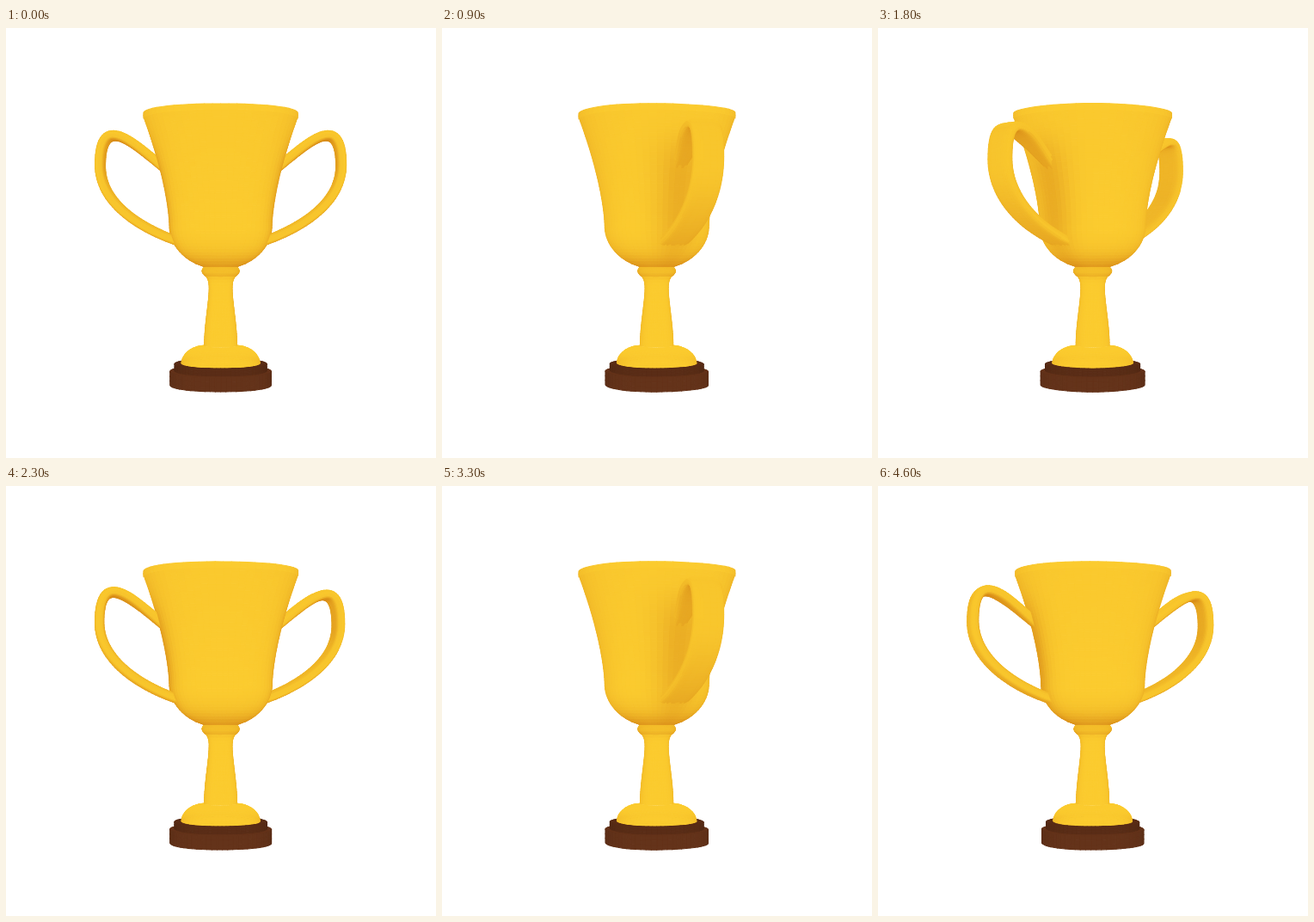
An HTML page with a canvas that plays this animation: 500x500 px, repeating every 4.7 s.

```html
<!DOCTYPE html>
<html lang="en">
<head>
<meta charset="utf-8">
<title>Rotating trophy</title>
<style>
html, body { margin: 0; height: 100%; overflow: hidden; background: #fff; }
canvas { display: block; width: 500px; height: 500px; }
</style>
</head>
<body>
<canvas id="stage" width="500" height="500"></canvas>
<script>
const ctx = document.getElementById('stage').getContext('2d');
const CAMERA = 1200, CX = 249.6, CY = 250;
const STEP_MS = 100, STEPS = 47, TURN = Math.PI / 24;
const GOLD = { dark: [216, 140, 25], light: [251, 203, 47] };
const BROWN = { dark: [66, 32, 15], light: [100, 51, 26] };

const faces = [];
const ease = t => t * t * (3 - 2 * t);
const bump = (x, width) => Math.exp(-((x / width) ** 2));
const range = (n, fn) => Array.from({ length: n + 1 }, (_, i) => fn(i / n));

// Joins a grid of points into faces; shade(i, j) gives the local darkening.
function addGrid(grid, tint, shade) {
  for (let i = 0; i < grid.length - 1; i++)
    for (let j = 0; j < grid[i].length - 1; j++)
      faces.push({
        pts: [grid[i][j], grid[i + 1][j], grid[i + 1][j + 1], grid[i][j + 1]],
        tint, shade: shade(i, j)
      });
}

// Turns a profile around the axis: radius(t, y) from height top to bottom.
function lathe(top, bottom, rows, radius, tint = GOLD, shade = () => 0) {
  const N = 64;
  const height = t => top + (bottom - top) * t;
  const grid = range(rows, t => range(N, k => {
    const f = k * 2 * Math.PI;
    const r = radius(t, height(t)) * (1.027 - .027 * Math.cos(2 * f) ** 2);
    return [r * Math.cos(f), height(t), r * Math.sin(f)];
  }));
  addGrid(grid, tint, (i, j) => shade(height((i + .5) / rows), (j + .5) / N * 2 * Math.PI));
}

function disc(top, bottom, r, shade) {
  lathe(top, top, 6, t => r * (.7 + .3 * t), BROWN, () => shade);
  lathe(top, bottom, 3, () => r, BROWN, () => shade);
}

function cupRadius(t, y) {
  const waist = -20;
  return y < waist
    ? 59.5 + 29 * ((waist - y) / 124) ** 1.55
    : 59.5 * Math.sqrt(1 - ((y - waist) / 50) ** 2);
}

// Soft contact shadows beside the handles and above the neck.
function cupShade(y, f) {
  const side = Math.asin(Math.sin(f));
  return .45 * bump(side, .4) * bump(((y + 50) / 65) ** 2, 1) + .3 * bump(y - 27, 12);
}

function bezier(a, b, c, d) {
  return t => [0, 1].map(k => {
    const u = 1 - t;
    return u * u * u * a[k] + 3 * u * u * t * b[k] + 3 * u * t * t * c[k] + t * t * t * d[k];
  });
}

function addHandle(dir) {
  const N = 24, ROWS = 34;
  const upper = bezier([59, -82], [95, -110], [140, -158], [140, -90]);
  const lower = bezier([140, -90], [140, -45], [90, -15], [46, -1]);
  const line = [...range(ROWS, upper), ...range(ROWS, lower).slice(1)];
  const soft = v => Math.sign(v) * Math.abs(v) ** .55;
  const grid = line.map(([r, y], i) => {
    const a = line[Math.max(i - 1, 0)], b = line[Math.min(i + 1, line.length - 1)];
    const tx = b[0] - a[0], ty = b[1] - a[1], len = Math.hypot(tx, ty);
    const width = 7 + 10 * ease(Math.min(1, i / ROWS * 2));
    return range(N, k => {
      const f = k * 2 * Math.PI, h = 5 * soft(Math.sin(f)), w = -width * soft(Math.cos(f));
      return [dir * (r + h * ty / len), y - h * tx / len, dir * w];
    });
  });
  addGrid(grid, GOLD, (i, j) => .07 + .25 * Math.max(0, -Math.sin((j + .5) / N * 2 * Math.PI)));
}

lathe(-150, -144, 2, () => 89.3);
lathe(-144, 27, 50, cupRadius, GOLD, cupShade);
lathe(27, 38, 8, t => 18 + 3.5 * Math.sin(Math.PI * t), GOLD, () => .2);
lathe(38, 119, 24, t => 12.3 + 6.5 * ease(t) + 5 * Math.exp(-14 * t));
lathe(120, 140.5, 14, t => 19 + 26.5 * Math.sqrt(1 - (1 - t) ** 2));
disc(140.5, 149, 53.5, .3);
disc(149, 164.5, 58.7, 0);
addHandle(1);
addHandle(-1);

function light([a, b, c, d], shade) {
  const u = c.map((v, k) => v - a[k]), w = d.map((v, k) => v - b[k]);
  const nx = u[1] * w[2] - u[2] * w[1], ny = u[2] * w[0] - u[0] * w[2], nz = u[0] * w[1] - u[1] * w[0];
  const len = Math.hypot(nx, ny, nz) || 1;
  const facing = Math.max(0, nz / len, -ny / len), down = Math.max(0, ny / len);
  return Math.max(0, 1 - .4 * (1 - facing) ** 2 - .3 * down * down - shade);
}

function draw(angle) {
  const cos = Math.cos(angle), sin = Math.sin(angle), visible = [];
  for (const { pts, tint, shade } of faces) {
    const world = pts.map(([x, y, z]) => [x * cos - z * sin, y, x * sin + z * cos]);
    const flat = world.map(([x, y, z]) => {
      const s = CAMERA / (CAMERA - z);
      return [CX + x * s, CY + y * s];
    });
    const [a, b, c, d] = flat;
    const area = (c[0] - a[0]) * (d[1] - b[1]) - (c[1] - a[1]) * (d[0] - b[0]);
    if (area <= .001) continue;
    const t = light(world, shade);
    const rgb = tint.dark.map((v, k) => Math.round(v + (tint.light[k] - v) * t));
    visible.push({ flat, color: `rgb(${rgb})`, depth: world.reduce((sum, p) => sum + p[2], 0) });
  }
  visible.sort((p, q) => p.depth - q.depth);

  ctx.fillStyle = '#fff';
  ctx.fillRect(0, 0, 500, 500);
  ctx.lineWidth = 1.1;
  ctx.lineJoin = 'round';
  for (const { flat, color } of visible) {
    ctx.beginPath();
    flat.forEach(([x, y]) => ctx.lineTo(x, y));
    ctx.closePath();
    ctx.fillStyle = ctx.strokeStyle = color;
    ctx.fill();
    ctx.stroke();
  }
}

let shown = -1;
function tick() {
  const step = Math.floor(performance.now() / STEP_MS) % STEPS;
  if (step !== shown) draw((shown = step) * TURN);
  requestAnimationFrame(tick);
}
tick();
</script>
</body>
</html>
```
